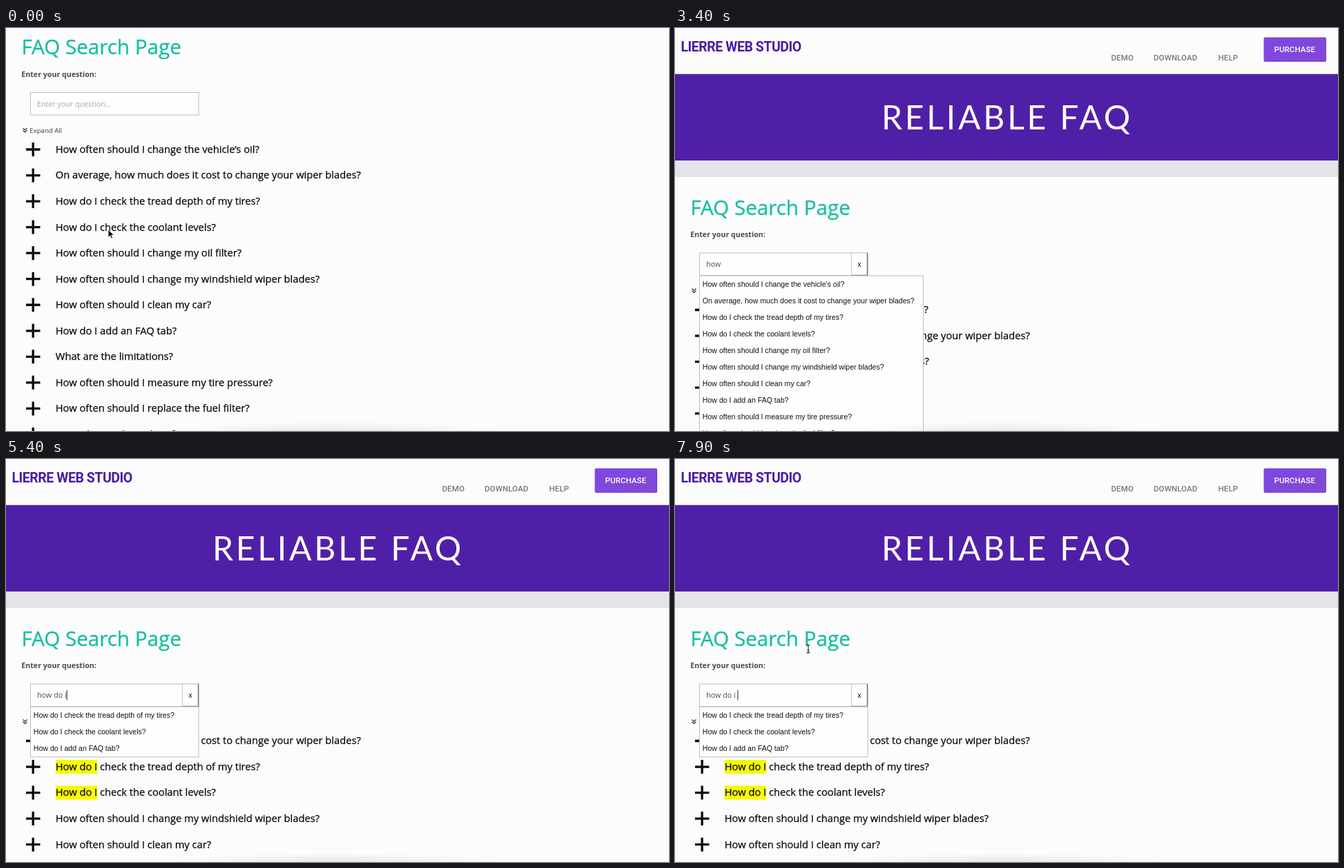
Recreate the animation shown at these times as an HTML page. Size 960 by 584 pixels, loop 8000 ms.

```html
<!DOCTYPE html>
<html lang="en">
<head>
<meta charset="utf-8">
<title>FAQ Search</title>
<style>
  html, body { margin: 0; width: 100%; height: 100%; overflow: hidden; background: #fcfcfd; }
  svg { display: block; width: 960px; height: 584px; }
  text { font-family: "Open Sans", sans-serif; white-space: pre; }
  .brand { font: 700 19.5px Roboto, sans-serif; letter-spacing: -.45px; fill: #4b1b9f; }
  .nav { font: 500 11.5px Roboto, sans-serif; letter-spacing: .1px; fill: #77757c; }
  .hero { font: 400 48px Lato, sans-serif; letter-spacing: 3.8px; fill: #fff; }
  .title { font-size: 29.6px; fill: #17bfa0; stroke: #17bfa0; stroke-width: .35px; }
  .label { font-size: 10.65px; font-weight: 700; fill: #4a4a4e; }
  .field { font-size: 10.7px; }
  .expand { font-size: 9.65px; fill: #38384e; }
  .row { font-size: 14.68px; fill: #08080c; stroke: #08080c; stroke-width: .25px; }
  .item { font: 400 10.58px "Liberation Sans", Arial, sans-serif; fill: #101014; }
</style>
</head>
<body>
<svg viewBox="0 0 960 584" xmlns="http://www.w3.org/2000/svg">
  <defs>
    <linearGradient id="btn" x1="0" y1="0" x2="1" y2="1">
      <stop offset="0" stop-color="#7c48e2"/>
      <stop offset="1" stop-color="#8447d4"/>
    </linearGradient>
    <radialGradient id="glow">
      <stop offset="0" stop-color="#c9c9d4" stop-opacity=".6"/>
      <stop offset="1" stop-color="#c9c9d4" stop-opacity="0"/>
    </radialGradient>
  </defs>
  <rect width="960" height="584" fill="#fcfcfd"/>
  <g id="head">
    <text class="brand" x="8.5" y="33.5">LIERRE WEB STUDIO</text>
    <text class="nav" x="631.5" y="47.2">DEMO</text>
    <text class="nav" x="693" y="47.2">DOWNLOAD</text>
    <text class="nav" x="786.5" y="47.2">HELP</text>
    <rect x="852.5" y="13.5" width="90.5" height="35.5" rx="2" fill="url(#btn)"/>
    <text class="nav" x="867.5" y="35.3" style="fill:#fff">PURCHASE</text>
    <rect y="66.7" width="960" height="125.3" fill="#501fa8"/>
    <text class="hero" x="481" y="146.5" text-anchor="middle">RELIABLE FAQ</text>
    <rect y="192" width="960" height="24" fill="#e3e5ea"/>
  </g>
  <g id="page">
    <text class="title" x="22.4" y="38.3">FAQ Search Page</text>
    <text class="label" x="22.3" y="70.5">Enter your question:</text>
    <path d="M24.5 145l3 2.8 3-2.8M24.5 148.3l3 2.8 3-2.8" fill="none" stroke="#3d3d58" stroke-width="1.3"/>
    <text class="expand" x="34.3" y="152">Expand All</text>
    <g id="list"></g>
    <g id="search"></g>
    <g id="menu"></g>
  </g>
  <ellipse cx="475" cy="592" rx="265" ry="22" fill="url(#glow)"/>
  <g id="mouse"></g>
</svg>
<script>
const LOOP = 8000, STEP = 100, SCROLL = 232.5;
const ROW_X = 71.8, ROW_SIZE = 14.68;
const el = id => document.getElementById(id);
const pen = document.createElement('canvas').getContext('2d');

const Q = {
  oil: 'How often should I change the vehicle’s oil?',
  cost: 'On average, how much does it cost to change your wiper blades?',
  tread: 'How do I check the tread depth of my tires?',
  cool: 'How do I check the coolant levels?',
  filter: 'How often should I change my oil filter?',
  wiper: 'How often should I change my windshield wiper blades?',
  clean: 'How often should I clean my car?',
  tab: 'How do I add an FAQ tab?',
  limits: 'What are the limitations?',
  tire: 'How often should I measure my tire pressure?',
  fuel: 'How often should I replace the fuel filter?',
  order: 'Can I choose the order of my FAQs?'
};
const ALL = Object.keys(Q);
const HOW = ALL.filter(k => /how/i.test(Q[k]));
const HOW_DO = ALL.filter(k => /how do /i.test(Q[k]));
const MATCHED = ['cost', 'tread', 'cool', 'wiper', 'clean'];

// [start time, value]
const TYPED = [[0, ''], [2200, 'h'], [2400, 'ho'], [2500, 'how'], [3800, 'how '], [3900, 'how d'],
  [4000, 'how do'], [5000, 'how do '], [5100, 'how do i'], [7500, 'how do i ']];
const LIST = [[0, [ALL, '']], [4300, [HOW, 'how']], [5200, [MATCHED, 'how do i']]];
const MENU = [[0, null], [2900, [HOW, 324.5]], [4300, [HOW_DO, 244]]];
const CARET = [[0, 0], [1100, 1], [1600, 0], [2100, 1], [3000, 0], [3800, 1], [4500, 0],
  [5000, 1], [5700, 0], [6600, 1], [7100, 0], [7500, 1]];
const SCROLL_AT = 2600;

const at = (track, t) => track.reduce((v, [start, val]) => t >= start ? val : v, null);
const ease = p => { p = Math.min(1, Math.max(0, p)); return p * p * (3 - 2 * p); };
const mix = (a, b, p) => a + (b - a) * p;

function width(str, size) {
  pen.font = size + 'px "Open Sans", sans-serif';
  return pen.measureText(str).width;
}
const text = (cls, x, y, str, fill) =>
  `<text class="${cls}" x="${x}" y="${y}"${fill ? ` style="fill:${fill}"` : ''}>${str}</text>`;

const cache = {};
function put(id, html) {
  if (cache[id] !== html) el(id).innerHTML = cache[id] = html;
}

function listHtml([keys, term]) {
  return keys.map((k, i) => {
    const y = 175.6 + i * 37.54, q = Q[k];
    const pos = term ? q.toLowerCase().indexOf(term) : -1;
    let mark = '';
    if (pos >= 0) {
      const x = ROW_X + width(q.slice(0, pos), ROW_SIZE);
      const w = width(q.slice(pos, pos + term.length), ROW_SIZE);
      mark = `<rect x="${x}" y="${y - 9.6}" width="${w}" height="20" fill="#f7fb04"/>`;
    }
    return `<path d="M29 ${y + .4}h20.5M39.2 ${y - 9.6}v20" stroke="#08080a" stroke-width="3.3"/>`
      + mark + text('row', ROW_X, y + 5.3, q);
  }).join('');
}

function searchHtml(typed, caret, scrolled) {
  let s = '<rect x="35.5" y="93.5" width="243.5" height="32.5" fill="#fefeff" stroke="#bcbcce"/>';
  if (typed) {
    const x = scrolled ? 255.5 : 260.5, r = scrolled ? 278.5 : 282;
    s += `<rect x="${x}" y="93.5" width="${r - x}" height="32.5" fill="#fefeff" stroke="#c4c4d2"/>`
      + `<path d="M${r} 93.5V126H${x}" fill="none" stroke="#77777f" stroke-width="1.5"/>`
      + text('field', (x + r) / 2 - 2.8, 113.5, 'x', '#08080a');
  }
  s += typed ? text('field', 45.3, 113.5, typed, '#4b4b55')
             : text('field', 45, 113.5, 'Enter your question...', '#a5a5ab');
  if (caret) {
    s += `<rect x="${45.3 + width(typed, 10.7)}" y="102.5" width="1" height="14.5" fill="#222"/>`;
  }
  return s;
}

function menuHtml(menu) {
  if (!menu) return '';
  const [keys, w] = menu;
  return `<rect x="35.5" y="126.5" width="${w - .5}" height="${keys.length * 24 + .8}" fill="#fefeff" stroke="#b9b9c6"/>`
    + keys.map((k, i) => text('item', 39.8, 142.6 + i * 24, Q[k].replace('’', "'"))).join('');
}

const arrow = (x, y) => `<path transform="translate(${x} ${y})" d="M0 0V11.5L2.7 9 4.6 13.2 6.5 12.4 4.7 8.3H8.2Z"
  fill="#000" stroke="#fff" stroke-width=".9"/>`;
const beam = (x, y) => `<path transform="translate(${x} ${y})" d="M-2.5-6Q0-6 0-4Q0-6 2.5-6M0-4.5V4.5M-2.5 6Q0 6 0 4Q0 6 2.5 6M-1.5 2h3"
  fill="none" stroke="#222" stroke-width="1.1"/>`;

function mouseHtml(t) {
  if (t < 2100) {
    const p = ease((t - 100) / 800);
    const x = mix(148, 122, p), y = mix(292, 110, p);
    return y < 126 ? beam(x, y) : arrow(x, y);
  }
  if (t >= 7500) {
    const p = ease((t - 7500) / 400);
    return beam(mix(300, 193, p), mix(305, 275, p));
  }
  return '';
}

function draw(time) {
  const t = Math.floor((time % LOOP) / STEP) * STEP;
  const scrolled = t >= SCROLL_AT;
  el('head').setAttribute('visibility', scrolled ? 'visible' : 'hidden');
  el('page').setAttribute('transform', `translate(0 ${scrolled ? SCROLL : 0})`);
  put('list', listHtml(at(LIST, t)));
  put('search', searchHtml(at(TYPED, t), at(CARET, t), scrolled));
  put('menu', menuHtml(at(MENU, t)));
  put('mouse', mouseHtml(t));
}

const start = performance.now();
function tick() {
  draw(performance.now() - start);
  requestAnimationFrame(tick);
}
tick();
</script>
</body>
</html>
```
